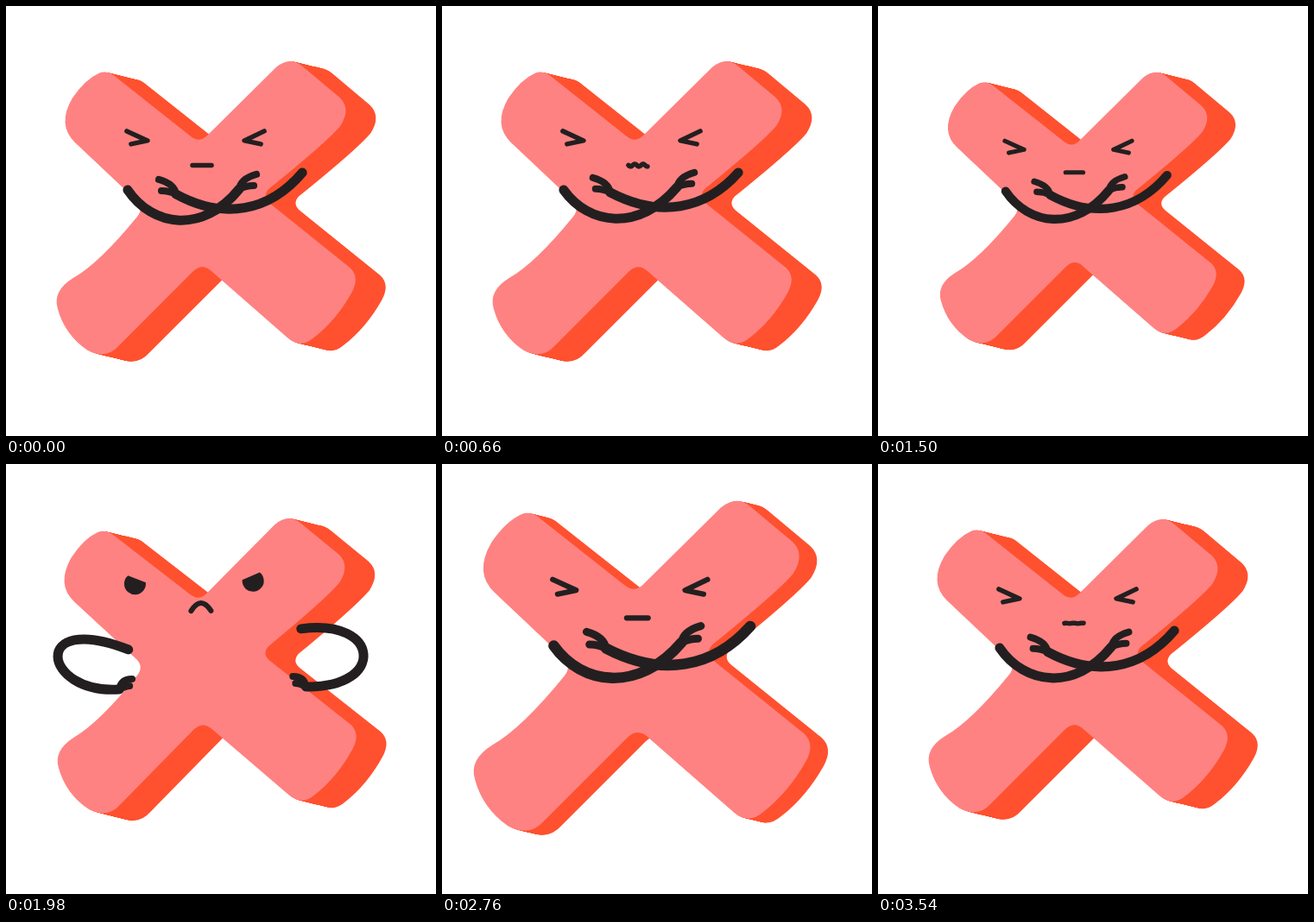
These frames come from a looping animation (498 px wide and 498 px high, 3600 ms). An HTML page with a canvas:

```html
<!DOCTYPE html>
<html>
<head>
<meta charset="utf-8">
<style>
html, body { margin: 0; width: 100%; height: 100%; overflow: hidden; background: #fff; }
canvas { display: block; }
</style>
</head>
<body>
<canvas id="stage" width="498" height="498"></canvas>
<script>
const ctx = document.getElementById('stage').getContext('2d');
const LOOP = 3600, STEP = 60, CX = 232.5, CY = 233, TAU = 2 * Math.PI;
const INK = '#231f20', FACE = '#ff8282', SIDE = '#ff512f';

const body = new Path2D(`M128 83L214 151Q224 159 233 150L313 71Q329 58 343 70
  L386 106Q400 119 387 139Q372 157 304 212Q296 221 306 229L398 303Q410 314 400 332
  Q382 364 356 384Q341 397 326 384L239 308Q228 297 217 307L131 393Q116 410 94 398
  Q68 380 60 350Q54 330 78 315Q108 298 152 244Q160 234 151 225L80 158
  Q59 138 77 107Q92 85 108 78Q118 74 128 83Z`);

// Shoulder, two curve controls, wrist; dir is the way the fingers point.
const arms = [
  { dir: 1, crossed: [141,213, 170,256, 228,264, 270,212], hips: [142,214, 28,168, 42,265, 131,260] },
  { dir: -1, crossed: [343,193, 305,238, 252,248, 197,218], hips: [342,192, 434,180, 440,262, 347,259] }];

// Breathing phase in turns: steady breaths, a held angry pose, a deep breath, a slow sigh.
const breath = [[0, -0.712], [1480, 1.53], [1700, 1.76], [1980, 1.712],
  [2300, 1.712], [2500, 1.5], [2790, 2], [3540, 2.288], [3600, 2.288]];

const mix = (a, b, k) => a + (b - a) * k;
const clamp = k => Math.max(0, Math.min(1, k));
const ramp = (t, from, to) => (1 - Math.cos(Math.PI * clamp((t - from) / (to - from)))) / 2;

function breathPhase(t) {
  const i = breath.findIndex(([end]) => t < end);
  const [t0, p0] = breath[i - 1], [t1, p1] = breath[i];
  return TAU * mix(p0, p1, (t - t0) / (t1 - t0));
}

function stroke(d, width) {
  ctx.lineWidth = width;
  ctx.stroke(new Path2D(d));
}

function drawArm({ dir, crossed, hips }, open, lift, inward) {
  const p = crossed.map((v, i) => mix(v, hips[i], open));
  const raise = 3 * lift * (1 - open), sink = 15 * inward * open;
  p[3] += sink - raise;
  p[5] += sink - raise;
  p[6] += dir * (raise + 0.8 * sink);
  p[7] -= raise + 0.15 * sink;
  const [x, y, ax, ay, bx, by, wx, wy] = p;
  stroke(`M${x} ${y}C${ax} ${ay} ${bx} ${by} ${wx} ${wy}`, 11);
  const reach = 20 - 5 * open;
  stroke(`M${wx} ${wy}q${2 * dir} -12 ${reach * dir} ${3 - reach}`, 8);
  stroke(`M${wx} ${wy}q${8 * dir} -4 ${(reach - 3) * dir} -4`, 8);
}

function drawEye(x, y, from, to) {
  ctx.beginPath();
  ctx.arc(x, y, 12.5, from * TAU / 360, to * TAU / 360);
  ctx.fill();
}

function drawAngryFace(calm) {
  drawEye(150.5, 138, -6, 230);
  drawEye(287, 136 + 2 * calm, -51, 185);
  const y = 170 + 2 * calm;
  stroke(`M215 ${y}Q226.5 ${y - 18 + 7 * calm} 238 ${y}`, 6);
}

function drawStrainedFace(t, tremble) {
  stroke('M140 145L164 156L145 160M299 145L276 156L295 160', 5.5);
  let d = 'M216 184.5';
  for (let x = 1; x <= 22; x++)
    d += `L${216 + x} ${184.5 + tremble * Math.sin(x * 0.65 + (t - 660) / 60)}`;
  stroke(d, 5.5);
}

function draw(t) {
  const phase = breathPhase(t);
  const scale = 1.0265 + 0.1065 * Math.cos(phase);
  const turn = -0.01 * Math.sin(Math.PI * clamp((t - 1660) / 640));
  const depth = 35.5 - 600 * Math.max(0, scale - 0.97) ** 2 - 60 * Math.max(0, 0.97 - scale);
  const effort = clamp(Math.min(t, LOOP - t) / 400);
  const lift = effort * (1 + Math.cos(phase - 0.7)) / 2;
  const tremble = 1.5 * effort * Math.max(0, Math.sin(phase));
  const open = ramp(t, 1500, 1740) - ramp(t, 2340, 2580);
  const calm = ramp(t, 1980, 2340);

  const pose = (dx, dy) => {
    ctx.setTransform(1, 0, 0, 1, CX + dx, CY + dy);
    ctx.rotate(turn);
    ctx.scale(scale, scale);
    ctx.translate(-CX, -CY);
  };
  ctx.setTransform(1, 0, 0, 1, 0, 0);
  ctx.fillStyle = '#fff';
  ctx.fillRect(0, 0, 498, 498);
  ctx.fillStyle = SIDE;
  for (let z = depth; z > 0; z--) {
    pose(z, z * 0.245);
    ctx.fill(body);
  }
  pose(0, 0);
  ctx.fillStyle = FACE;
  ctx.fill(body);

  ctx.fillStyle = ctx.strokeStyle = INK;
  ctx.lineCap = ctx.lineJoin = 'round';
  for (const arm of arms) drawArm(arm, open, lift, calm);
  pose(0, 62 * Math.max(0, 1 - scale));
  if (t >= 1560 && t < 2460) drawAngryFace(calm);
  else drawStrainedFace(t, tremble);
}

const start = performance.now();
function tick() {
  const t = (performance.now() - start) % LOOP;
  draw(Math.floor(t / STEP) * STEP);
  requestAnimationFrame(tick);
}
tick();
</script>
</body>
</html>
```
